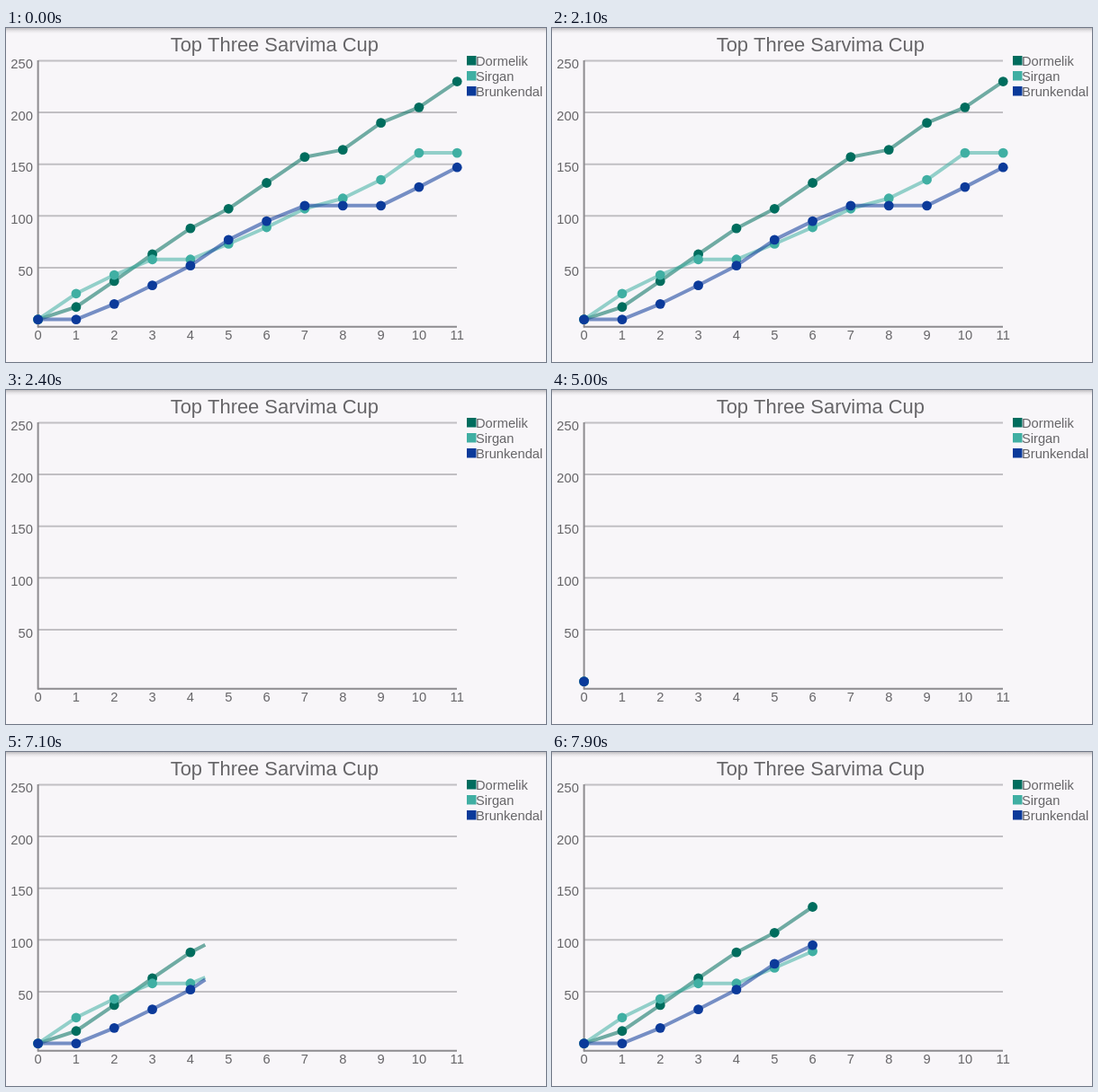
Write an HTML page with a canvas that moves like this. It is 600x372 px and loops after 8000 ms.

```html
<!DOCTYPE html>
<html lang="en">
<head>
<meta charset="utf-8">
<title>Line chart</title>
<style>
  html, body { margin: 0; width: 100%; height: 100%; overflow: hidden; background: #f8f6f9; }
  canvas { display: block; width: 600px; height: 372px; }
</style>
</head>
<body>
<canvas id="stage" width="600" height="372"></canvas>
<script>
const ctx = document.getElementById('stage').getContext('2d');
const W = 600, H = 372, LOOP = 8000, STEP = 100;
const DARK_AT = 2200, EMPTY_AT = 2400, DRAW_AT = 5000;
const FONT = '"Liberation Sans", Arial, Helvetica, sans-serif';
const BG = '#f8f6f9', INK = '#666568';
const LAST = 11;

const series = [
  { name: 'Dormelik', color: '#006d5e', data: [0, 12, 37, 63, 88, 107, 132, 157, 164, 190, 205, 230] },
  { name: 'Sirgan', color: '#40afa3', data: [0, 25, 43, 58, 58, 73, 89, 107, 117, 135, 161, 161] },
  { name: 'Brunkendal', color: '#0b3a9a', data: [0, 0, 15, 33, 52, 77, 95, 110, 110, 110, 128, 147] }
];

const xAt = i => 35.6 + i * 42.33;
const yAt = v => 324.6 - v * 1.1524;

function text(str, x, y, size, align) {
  ctx.font = size + 'px ' + FONT;
  ctx.textAlign = align;
  ctx.fillStyle = INK;
  ctx.fillText(str, x, y);
}

function line(x1, y1, x2, y2, color) {
  ctx.strokeStyle = color;
  ctx.lineWidth = 2;
  ctx.beginPath();
  ctx.moveTo(x1, y1);
  ctx.lineTo(x2, y2);
  ctx.stroke();
}

function drawFrame() {
  ctx.fillStyle = BG;
  ctx.fillRect(0, 0, W, H);
  const shade = ctx.createLinearGradient(0, 0, 0, 6);
  shade.addColorStop(0, '#bfbdc0');
  shade.addColorStop(0.5, '#e6e4e7');
  shade.addColorStop(1, BG);
  ctx.fillStyle = shade;
  ctx.fillRect(0, 0, W, 6);

  text('Top Three Sarvima Cup', 298.3, 26.3, 21.9, 'center');

  for (let v = 50; v <= 250; v += 50) {
    line(36, yAt(v), 501, yAt(v), '#c1bfc3');
    text(v, 29.8, yAt(v) + 8.6, 14.7, 'right');
  }
  line(35.6, 36, 35.6, 333.5, '#8d8b8f');
  line(35, 332.7, 501, 332.7, '#8d8b8f');
  for (let i = 0; i <= LAST; i++) text(i, xAt(i), 347, 14.7, 'center');

  series.forEach((s, i) => {
    ctx.fillStyle = s.color;
    ctx.fillRect(512, 31 + i * 17, 10.5, 10.5);
    text(s.name, 522, 41.5 + i * 17, 14.7, 'left');
  });
}

function drawSeries(s, p) {
  const whole = Math.min(Math.floor(p), LAST);
  ctx.beginPath();
  for (let i = 0; i <= whole; i++) ctx.lineTo(xAt(i), yAt(s.data[i]));
  if (whole < LAST) {
    const a = s.data[whole], b = s.data[whole + 1];
    ctx.lineTo(xAt(p), yAt(a + (b - a) * (p - whole)));
  }
  ctx.globalAlpha = 0.55;
  ctx.strokeStyle = s.color;
  ctx.lineWidth = 4;
  ctx.lineJoin = 'round';
  ctx.stroke();
  ctx.globalAlpha = 1;

  ctx.fillStyle = s.color;
  for (let i = 0; i <= whole; i++) {
    ctx.beginPath();
    ctx.arc(xAt(i), yAt(s.data[i]), 5.4, 0, Math.PI * 2);
    ctx.fill();
  }
}

function drawDark() {
  ctx.fillStyle = '#141d2b';
  ctx.fillRect(0, 0, W, H);
  ctx.fillStyle = '#0e1520';
  ctx.fillRect(0, H - 2, W, 2);
  ctx.fillStyle = '#5c6068';
  ctx.fillRect(W - 1, 0, 1, H);
}

function render(now) {
  const t = Math.floor((now % LOOP) / STEP) * STEP;
  if (t >= DARK_AT && t < EMPTY_AT) {
    drawDark();
  } else {
    drawFrame();
    const p = t < DARK_AT ? LAST : (t - DRAW_AT + 15) / 482;
    if (t < DARK_AT || t >= DRAW_AT) series.forEach(s => drawSeries(s, p));
  }
}

let start = null;
function tick(now) {
  if (start === null) start = now;
  render(Math.max(0, now - start));
  requestAnimationFrame(tick);
}
render(0);
requestAnimationFrame(tick);
</script>
</body>
</html>
```
